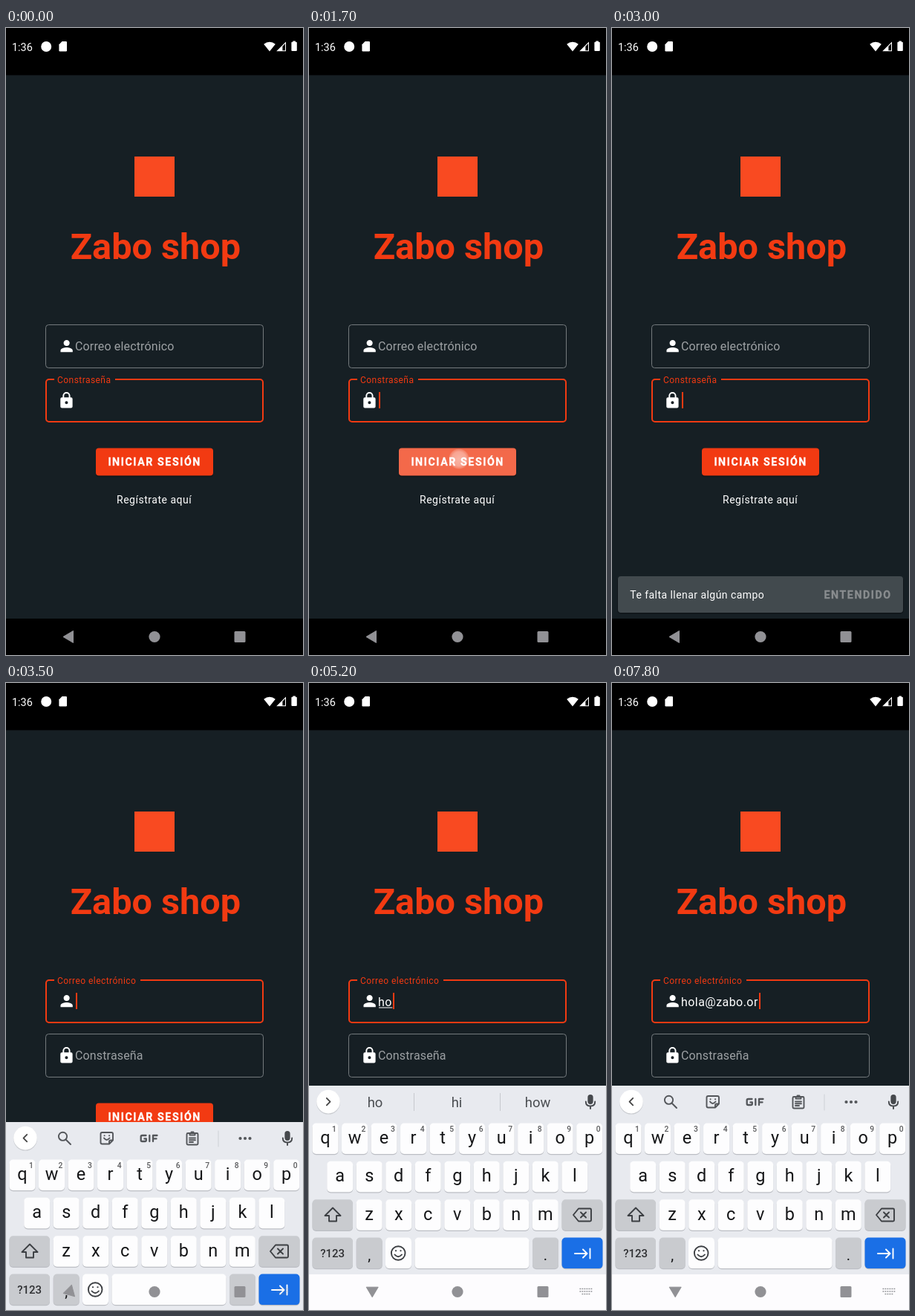
An HTML page for the animation above (8 s loop, 400 px wide and 844 px high).

```html
<!DOCTYPE html>
<html lang="es">
<head>
<meta charset="utf-8">
<title>Zabo shop</title>
<style>
  html, body { margin: 0; width: 100%; height: 100%; overflow: hidden; background: #000; }
  svg { display: block; width: 100%; height: 100%; font-family: Roboto, "Noto Sans", sans-serif; }
  text { white-space: pre; }
  .line { fill: none; stroke-linecap: round; stroke-linejoin: round; }
  .caps { font-size: 14.2px; font-weight: 700; letter-spacing: 1.58px; fill: currentColor; stroke: currentColor; stroke-width: .3px; }
</style>
</head>
<body>
<svg viewBox="0 0 400 844">
  <defs>
    <radialGradient id="dot">
      <stop offset="0" stop-color="#fff" stop-opacity=".5"/>
      <stop offset=".7" stop-color="#fff" stop-opacity=".4"/>
      <stop offset="1" stop-color="#fff" stop-opacity=".12"/>
    </radialGradient>
  </defs>
  <rect width="400" height="844"/>
  <rect y="63.5" width="400" height="731.5" fill="#161f24"/>

  <!-- status bar -->
  <g fill="#fff">
    <text x="8" y="31" font-size="14.4">1:36</text>
    <circle cx="54.2" cy="25" r="7"/>
    <g transform="translate(0 -.5)">
      <path d="M75.5 18.5h5.2q1.3 0 1.3 1.3v10.9q0 1.3-1.3 1.3h-8q-1.3 0-1.3-1.3v-8z"/>
      <path d="M355 32l-7.8-9.8q3.4-2.9 7.8-2.9t7.8 2.9z"/>
      <path d="M377 19v12.8h-12.8zM376 21.6l-3.6 3.6v5.6h3.6z" fill-rule="evenodd"/>
      <path d="M386.4 19.3V18h3.4v1.3h1q1 0 1 1v10.2q0 1-1 1h-5.4q-1 0-1-1V20.3q0-1 1-1z"/>
    </g>
  </g>

  <rect x="173" y="173" width="54" height="54" fill="#f94a21"/>
  <text x="201.4" y="311" font-size="48.6" font-weight="700" text-anchor="middle" fill="#f23a12">Zabo shop</text>

  <g id="fields"></g>
  <g fill="#fff">
    <path transform="translate(69.4 415.8) scale(1.02)" d="M12 12c2.21 0 4-1.79 4-4s-1.79-4-4-4-4 1.79-4 4 1.79 4 4 4zm0 2c-2.67 0-8 1.34-8 4v2h16v-2c0-2.66-5.33-4-8-4z"/>
    <path transform="translate(69.2 489) scale(1.02)" fill-rule="evenodd" d="M18 8h-1V6a5 5 0 0 0-10 0v2H6a2 2 0 0 0-2 2v10a2 2 0 0 0 2 2h12a2 2 0 0 0 2-2V10a2 2 0 0 0-2-2zM12 17a2 2 0 1 1 0-4 2 2 0 0 1 0 4zM8.9 8V6a3.1 3.1 0 0 1 6.2 0v2z"/>
    <text id="typed" x="93" y="434.5" font-size="16" letter-spacing=".45"></text>
    <rect id="under" x="94" y="436.5" height="1"/>
  </g>
  <rect id="caret" width="2" height="22" fill="#f23a12"/>

  <rect x="121" y="567.5" width="158" height="37" rx="4" fill="#000" opacity=".25"/>
  <rect x="121" y="565.5" width="158" height="37" rx="4" fill="#f23a12"/>
  <rect id="ripple" x="121" y="565.5" width="158" height="37" rx="4" fill="#f4e9e2"/>
  <text class="caps" x="137.4" y="589.3" color="#fff">INICIAR SESIÓN</text>
  <text x="149" y="640" font-size="14" letter-spacing=".52" fill="#fff">Regístrate aquí</text>
  <circle id="touch" cx="202" cy="580" r="13.5" fill="url(#dot)"/>

  <g id="snack">
    <rect x="7" y="739" width="386" height="50" rx="5" fill="#000" opacity=".25"/>
    <rect x="8" y="738" width="384" height="49" rx="4" fill="#424a4e"/>
    <text x="24.3" y="768" font-size="14" letter-spacing=".45" fill="#fff">Te falta llenar algún campo</text>
    <text class="caps" x="285.5" y="768" color="#898d8f">ENTENDIDO</text>
  </g>

  <g id="board">
    <rect y="542" width="400" height="254" fill="#e8eaef"/>
    <rect y="796" width="400" height="350" fill="#fdfcfe"/>
    <g id="keys"></g>
    <circle cx="26" cy="564.6" r="16" fill="#c9cbd0"/>
    <circle cx="26" cy="563.6" r="15.8" fill="#fff"/>
    <path id="chevron" class="line" stroke="#444" stroke-width="1.8"/>
    <g id="tools" class="line" stroke="#53565a" stroke-width="1.9">
      <circle cx="76.5" cy="561.3" r="5.6"/><path d="M81 566l6 6"/>
      <path d="M129.5 556h12.5q2 0 2 2v8.5l-5 5h-9.5q-2 0-2-2v-11.5q0-2 2-2zM144 566.5h-3q-2 0-2 2v3M132 563.5q3.5 5 7.5 0M132.5 560.3h.2M139 560.3h.2"/>
      <path d="M188.5 560h-5q-1.8 0-1.8 1.6v4.8q0 1.6 1.8 1.6h3.5q1.8 0 1.8-1.6v-2h-2.4M193.3 560v8M198 568v-8h5.5M198 564.4h4.5" stroke-width="2.3"/>
      <path d="M245 557h12q1.5 0 1.5 1.5v12.5q0 1.5-1.5 1.5h-12q-1.5 0-1.5-1.5v-12.5q0-1.5 1.5-1.5zM247.5 557v2.5h7v-2.5M247 563.5h8M247 566.3h8M247 569h5M249.5 555.5h3"/>
      <path d="M286 554v21" stroke="#cdd0d5" stroke-width="1"/>
      <g fill="#53565a" stroke="none">
        <circle cx="315.5" cy="564" r="2.1"/><circle cx="322" cy="564" r="2.1"/><circle cx="328.5" cy="564" r="2.1"/>
      </g>
    </g>
    <g id="hints" font-size="18.4" fill="#4a4d51" text-anchor="middle">
      <text x="89" y="571"></text><text x="199" y="571"></text><text x="308" y="571"></text>
      <path d="M141.5 552v24M257.5 552v24" stroke="#c6c9ce"/>
    </g>
    <g class="line" stroke="#46494d" stroke-width="1.9">
      <rect x="376.3" y="555" width="5.4" height="11" rx="2.7" fill="#46494d"/>
      <path d="M372.8 563.5q0 6 6.2 6t6.2-6M379 569.5v3.5"/>
    </g>
  </g>

  <g id="nav" fill="#919195">
    <path id="back" d="M77 819.5l13.5-8v16z" stroke="#919195" stroke-linejoin="round"/>
    <circle cx="200" cy="819.5" r="7.6"/>
    <rect x="307.5" y="812" width="15" height="15" rx="1.5"/>
    <path id="ime" d="M364.5 815.5h17M364.5 819h17M367.5 822.5h11" fill="none" stroke="#8f9195" stroke-width="1.7" stroke-dasharray="1.8 1.2"/>
  </g>
</svg>
<script>
const $ = id => document.getElementById(id);
const ACCENT = '#f23a12', HINT = '#9da1a4', LOOP = 8000;
const FOCUS = 3300, AT_SIGN = 6100;

const typing = [
  [0, ''], [4200, 'h'], [5100, 'ho'], [5500, 'hol'], [5800, 'hola'], [AT_SIGN, 'hola@'],
  [6300, 'hola@z'], [6500, 'hola@za'], [6700, 'hola@zab'], [6900, 'hola@zabo'],
  [7200, 'hola@zabo.'], [7400, 'hola@zabo.o'], [7700, 'hola@zabo.or']
];
const guesses = {
  h: ['h', 'he', 'how'], ho: ['ho', 'hi', 'how'],
  hol: ['hol', 'how', 'hold'], hola: ['hola', 'Hola', 'hold']
};

const clamp = v => Math.max(0, Math.min(1, v));
const mix = (a, b, p) => a + (b - a) * p;
const set = (el, attrs) => { for (const k in attrs) el.setAttribute(k, attrs[k]); };

function buildKeys() {
  const key = (x, y, w, fill) =>
    `<rect x="${x}" y="${y + 1.2}" width="${w}" height="41.5" rx="5" fill="#bcbec4"/>` +
    `<rect x="${x}" y="${y}" width="${w}" height="41.5" rx="5" fill="${fill}"/>`;
  const label = (s, x, y, size, more = '') =>
    `<text x="${x}" y="${y}" font-size="${size}" text-anchor="middle" fill="#151618" ${more}>${s}</text>`;
  const icon = (d, color) => `<path class="line" d="${d}" stroke="${color}" stroke-width="1.9"/>`;
  const white = '#fdfdfe', gray = '#c9cbcf';
  let out = '';
  [['qwertyuiop', 22, 592.5], ['asdfghjkl', 41.7, 643.8], ['zxcvbnm', 81.2, 695.2]].forEach(([row, x0, y], r) => {
    [...row].forEach((c, i) => {
      const x = x0 + i * 39.52;
      out += key(x - 17.5, y, 35, white) + label(c, x, y + 27.5, 23.5);
      if (!r) out += label((i + 1) % 10, x + 12, y + 11.8, 10.3, 'font-weight="500" opacity=".7"');
    });
  });
  out += key(4.5, 695.2, 54.5, gray) + key(340.5, 695.2, 55, gray);
  out += icon('M32 706.5l10.5 10.5h-5.5v7.5h-10v-7.5h-5.5z', '#3c3f43');
  out += icon('M363 707.5h15.5q1.5 0 1.5 1.5v14q0 1.5-1.5 1.5h-15.5l-7-8.5zM366 712.5l7 7M373 712.5l-7 7', '#3c3f43');
  [[4.5, 54.5, gray], [63.7, 35, gray], [103, 35, white], [142.5, 154, white], [301, 35, gray], [340.5, 55, '#1a6fe6']]
    .forEach(([x, w, fill]) => out += key(x, 746.6, w, fill));
  out += label('?123', 31.7, 773, 15, 'font-weight="500" opacity=".85"') + label(',', 81.2, 777, 20) + label('.', 318.5, 777, 20);
  out += icon('M129.5 767.5a9.3 9.3 0 1 1-18.6 0a9.3 9.3 0 1 1 18.6 0zM115.5 769.5q4.7 5.5 9.4 0M116.8 764.3h.4M123.3 764.3h.4', '#3c3f43');
  out += icon('M358 768h16M369 762.5l5.5 5.5l-5.5 5.5M378.5 761.5v13', '#fff');
  $('keys').innerHTML = out;
}

function makeField(name, top, fullGap) {
  const g = document.createElementNS('http://www.w3.org/2000/svg', 'g');
  g.innerHTML = '<rect rx="4" fill="none"/><rect x="65" height="4" fill="#161f24"/><text></text>';
  $('fields').append(g);
  const [box, gap, text] = g.children;
  text.textContent = name;
  return (lift, focused) => {
    const inset = focused ? .5 : 0;
    set(box, {
      x: 53.5 + inset, y: top + inset, width: 293 - 2 * inset, height: 58 - 2 * inset,
      stroke: focused ? ACCENT : '#747a7d', 'stroke-width': focused ? 2 : 1
    });
    set(gap, { y: top - 1.5, width: fullGap * lift });
    set(text, {
      x: mix(93, 69, lift), y: mix(top + 34.5, top + 5, lift), 'font-size': mix(16, 12, lift),
      'letter-spacing': mix(.15, .45, lift), fill: focused ? ACCENT : HINT
    });
  };
}

function caretOn(t, lastKey) {
  if (t < FOCUS) return (t + 400) % 1000 < 500 && t >= 600;
  return (t - Math.max(FOCUS, lastKey)) % 1000 < 500;
}

function draw(t) {
  const mail = t >= FOCUS;
  const lift = clamp((t - FOCUS) / 150);
  drawMail(lift, mail);
  drawPass(1 - lift, !mail);

  const [since, word] = typing.filter(k => k[0] <= t).pop();
  const typed = $('typed');
  typed.textContent = word;
  const width = word ? typed.getComputedTextLength() : 0;
  set($('under'), { width: word && t < AT_SIGN ? width - .5 : 0 });
  set($('caret'), { x: Math.round(94 + width), y: mail ? 417 : 490, opacity: caretOn(t, since) ? 1 : 0 });

  const held = t >= 1600 && t < 1800;
  set($('ripple'), { opacity: held ? .27 : t >= 1800 ? .27 * clamp((2100 - t) / 300) : 0 });
  set($('touch'), { opacity: held ? 1 : 0 });
  set($('snack'), { opacity: t < 3700 ? clamp((t - 1700) / 200) : 0 });

  const slide = clamp((t - FOCUS) / 400);
  const drop = Math.round(302 * (1 - slide) ** 2.62);
  set($('board'), { transform: `translate(0 ${drop})`, visibility: mail ? 'visible' : 'hidden' });
  set($('back'), { transform: `rotate(${-90 * slide ** 2.6} 84.7 819)` });
  set($('ime'), { opacity: slide ** 1.5 });

  const list = guesses[word];
  set($('hints'), { visibility: list ? 'inherit' : 'hidden' });
  set($('tools'), { visibility: list ? 'hidden' : 'inherit' });
  set($('chevron'), { d: list ? 'M23.8 558.8l4.7 4.8l-4.7 4.8' : 'M28.2 558.8l-4.7 4.8l4.7 4.8' });
  if (list) list.forEach((s, i) => $('hints').children[i].textContent = s);
}

buildKeys();
const drawMail = makeField('Correo electrónico', 399.5, 116);
const drawPass = makeField('Constraseña', 472.5, 82);

const start = performance.now();
function tick() {
  const t = (performance.now() - start) % LOOP;
  draw(Math.floor(t / 100) * 100);
  requestAnimationFrame(tick);
}
tick();
</script>
</body>
</html>
```
